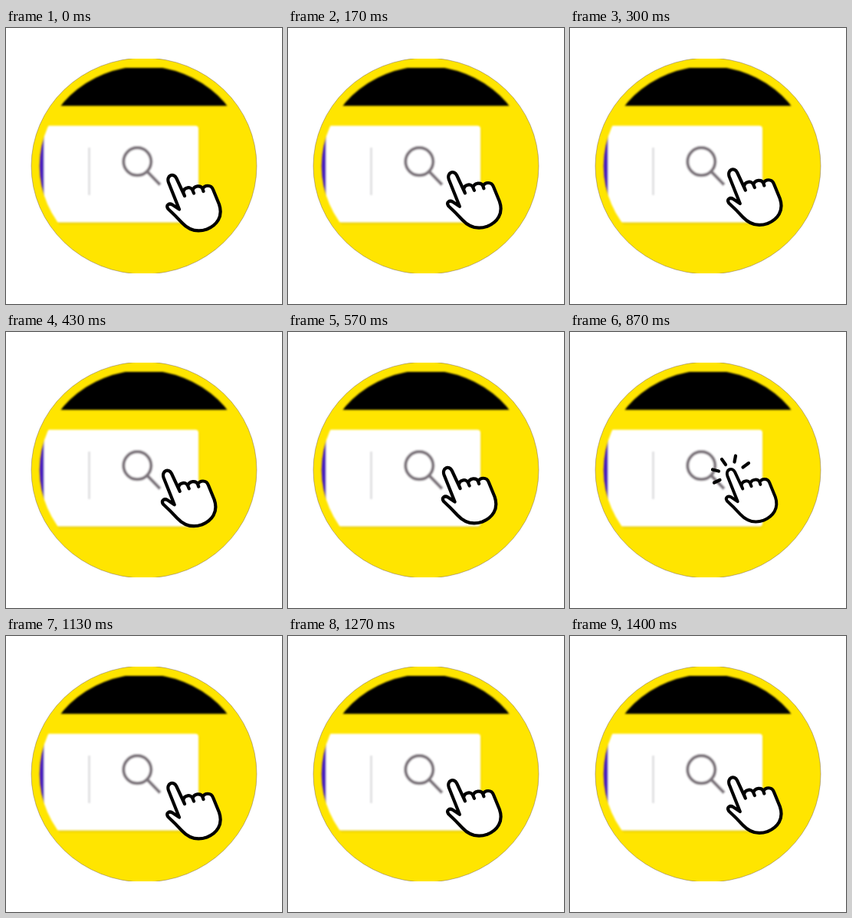
Recreate the animation shown at these times as an HTML page. Size 360 by 360 pixels, loop 1.51 s.

```html
<!DOCTYPE html>
<html lang="en">
<head>
<meta charset="utf-8">
<title>Search click</title>
<style>
  html, body { margin: 0; width: 100%; height: 100%; overflow: hidden; background: #fff; }
  svg { display: block; width: 100vw; height: 100vh; }
</style>
</head>
<body>
<svg viewBox="0 0 360 360">
  <defs>
    <clipPath id="band"><path d="M0 40H360V320H0Z"/></clipPath>
    <clipPath id="lens"><ellipse cx="180" cy="180" rx="136.3" ry="130"/></clipPath>
    <filter id="soft"><feGaussianBlur stdDeviation="1.2"/></filter>
    <filter id="shade"><feGaussianBlur stdDeviation="1.5"/></filter>
  </defs>

  <g clip-path="url(#band)">
    <ellipse cx="180" cy="180" rx="147" ry="141" fill="#ffe500" stroke="#75605a" stroke-opacity=".6" stroke-width=".8"/>
  </g>

  <g filter="url(#soft)">
    <g clip-path="url(#lens)">
      <path d="M30 52H330V101.500H30Z"/>
      <rect x="50" y="130" width="201" height="125" rx="4" fill="#a88f00" opacity=".4" filter="url(#shade)"/>
      <path d="M30 140H56V220H30Z" fill="#4a1fc0"/>
      <rect x="49.5" y="127.5" width="201.5" height="126" rx="4" fill="#fff"/>
      <path d="M107 156h3v62h-3z" fill="#e0e0e2"/>
      <g fill="none" stroke="#7d747c" stroke-width="4.2">
        <circle cx="171.3" cy="174.2" r="18"/>
        <path d="M184.500 187.500L201 204.500"/>
      </g>
    </g>
  </g>

  <g stroke="#000" stroke-width="4.2" stroke-linecap="round" stroke-linejoin="round">
    <path id="rays" d="M186 179.500L194 181.500M198 166L203 173M216 161.500L214.500 169.500M233 171L225.500 176.500M188 196.500L195.500 193"/>
    <path id="hand" fill="#fff" d="M226 236.500L212 201.500C208.800 192.500 218.500 188 222.300 196L233 219
      L231.200 214.500C232 207 241.500 206.500 243.300 211.500L245 215.500L243.500 212C245 205 254.500 204.800 256.500 210
      L257.500 213L256.500 210C259 204.500 267.500 204 270 210.500L278 230C283.500 246 275 257 262 262.500
      C248 267.500 237 262 229.500 254C224 248 217 241 211.500 236C208 231 213 228 217 230.500Z"/>
  </g>
</svg>
<script>
  const LOOP = 1510, PRESS = 4, CLICK = 6;
  const cuts = [170, 300, 430, 570, 700, 870, 1130, 1270, 1400];
  const hand = document.getElementById("hand");
  const rays = document.getElementById("rays");

  // The hand takes equal steps to the icon, shrinks as it presses, clicks, then starts over.
  function draw() {
    const time = performance.now() % LOOP;
    const step = cuts.filter(cut => cut <= time).length % (CLICK + 1);
    const moved = Math.min(step, PRESS);
    const scale = 1 - 0.028 * (step - moved);
    hand.setAttribute("transform",
      `translate(${245 - 2.1 * moved} ${228.5 - 3.75 * moved}) scale(${scale}) translate(-245 -228.5)`);
    rays.setAttribute("visibility", step === CLICK ? "visible" : "hidden");
    requestAnimationFrame(draw);
  }
  draw();
</script>
</body>
</html>
```
